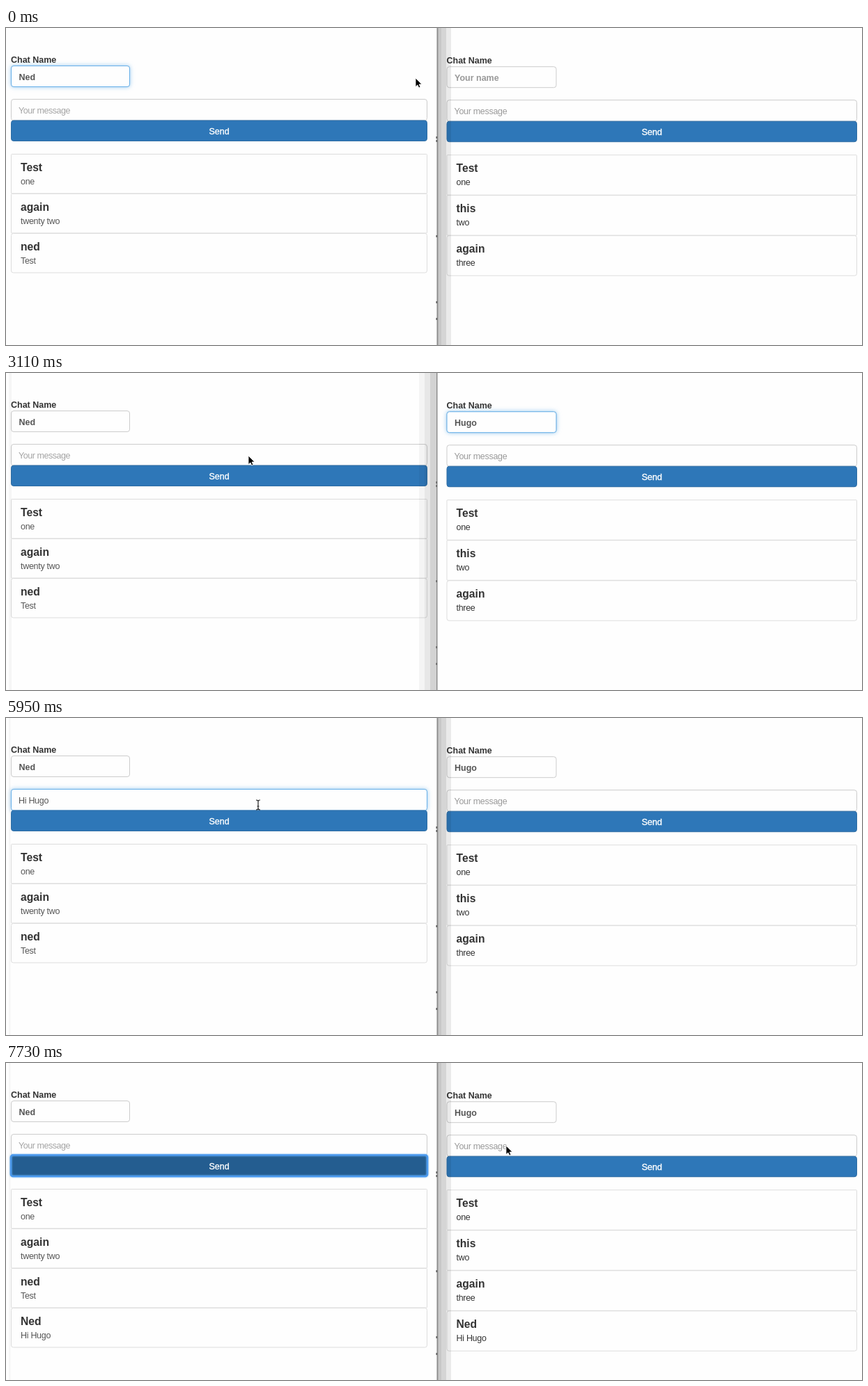
Recreate the animation shown at these times as an HTML page. Size 1229 px wide and 456 px high, loop 8 s.

```html
<!DOCTYPE html>
<html lang="en">
<head>
<meta charset="utf-8">
<title>Chat demo</title>
<style>
html, body { margin: 0; width: 100%; height: 100%; overflow: hidden; background: #fefefe; }
svg { display: block; width: 100%; height: 100%; }
text { font: 12.5px "Liberation Sans", Arial, sans-serif; fill: #333; white-space: pre; }
.label { font-weight: bold; }
.name { font-weight: bold; fill: #555; }
.head { font-weight: bold; font-size: 15.7px; }
.light { letter-spacing: -.3px; fill: #555; }
.right .light { fill: #333; }
.name.hint, .light.hint { fill: #999; }
.left .light.hint { letter-spacing: -.45px; fill: #a4a4a4; }
.send { fill: #fff; stroke: #fff; stroke-width: .35px; text-anchor: middle; }
.field { fill: #fefefe; stroke: #ccc; }
.item { fill: none; stroke: #ddd; }
.ring { fill: #fefefe; stroke: #66afe9; filter: drop-shadow(0 0 3px #66afe9aa); }
.halo { fill: none; stroke: #4a98ee; stroke-width: 2.5px; filter: drop-shadow(0 0 1px #66afe9); }
</style>
</head>
<body>
<svg id="stage" viewBox="0 0 1229 456"></svg>
<script>
const LOOP = 8000;
const stage = document.getElementById('stage');
const ME = 'Ned', FRIEND = 'Hugo', HELLO = 'Hi ' + FRIEND;

// time, shape, x, y
const moves = [
  [0, 'arrow', 588, 72], [140, 'arrow', 604, 73], [290, 'arrow', 682, 75],
  [440, 'arrow', 790, 77], [580, 'arrow', 834, 76], [730, 'arrow', 834, 75],
  [880, 'arrow', 796, 74], [1020, 'beam', 730, 73], [1170, 'beam', 710, 73],
  [2670, 'arrow', 660, 93], [2810, 'arrow', 520, 140], [2960, 'arrow', 390, 148],
  [3110, 'arrow', 348, 119], [3410, 'beam', 349, 122], [5950, 'beam', 362, 125],
  [6100, 'arrow', 401, 138], [6250, 'hand', 437, 154], [6390, 'hand', 445, 166],
  [7290, 'hand', 468, 165], [7440, 'hand', 560, 154], [7590, 'arrow', 668, 132],
  [7730, 'arrow', 718, 119]
];
// time, letters typed
const friendKeys = [[0, 0], [2070, 1], [2220, 2], [2370, 3], [2520, 4]];
const helloKeys = [[0, 0], [4760, 1], [4910, 2], [5060, 3], [5360, 4], [5510, 6], [5650, 7], [6690, 0]];

const shapes = {
  arrow: '<path d="M0 0V12.6L2.9 9.9 4.8 14 6.9 13 5.1 9H9Z" fill="#000" stroke="#fff" stroke-width=".8"/>',
  beam: '<path d="M-3-7Q0-7 0-5Q0-7 3-7M0-5V5M-3 7Q0 7 0 5Q0 7 3 7M-1.5 2H1.5" fill="none" stroke="#222" stroke-width="1.2"/>',
  hand: '<path d="M-3.6 1V-6Q-2.5-8.2-1.4-6V-2Q0-3.4 1-1.6Q2.4-2.6 3.3-1Q5.4-1.8 5.6 1V3Q5.6 5 4.2 7.5H-2.2Q-3-.0-5.8 1.6Q-6.4-.4-3.6 1Z" fill="#fff" stroke="#111"/><path d="M-.6 2V5M1.4 2V5M3.3 2V5" stroke="#111" stroke-width=".7"/>'
};

const latest = (list, t) => list.filter(k => k[0] <= t).pop();
const clamp = v => Math.max(0, Math.min(1, v));
const fade = (t, from, to) => clamp((t - from) / 150) * clamp(1 - (t - to) / 150);
const text = (x, y, cls, s) => `<text x="${x}" y="${y}" class="${cls}">${s}</text>`;
const rect = (x, y, w, h, attrs) => `<rect x="${x}" y="${y}" width="${w}" height="${h}" ${attrs}/>`;
const shade = (x, w, alpha) => rect(x, 0, w, 456, `opacity="${alpha}"`);

function field(x, y, w, h, glow) {
  return rect(x, y, w, h, 'rx="3.5" class="field"') +
    (glow ? rect(x, y, w, h, `rx="3.5" class="ring" opacity="${glow}"`) : '');
}

function pane(p) {
  const { x, y, w, pitch } = p, mid = x + w / 2;
  let out = text(x, y + 50, 'label', 'Chat Name') +
    field(x + .5, y + 54.5, p.nameW, 30, p.nameGlow) +
    text(x + 11.5, y + 75, p.name ? 'name' : 'name hint', p.name || 'Your name') +
    field(x + .5, y + 102.5, w - 1, 30.5, p.messageGlow) +
    text(x + 11, y + 123, p.message ? 'light' : 'light hint', p.message || 'Your message') +
    rect(x + .5, y + 133, w - 1, 29.5, p.dark
      ? 'rx="3.5" fill="#245d90" stroke="#204d74"'
      : 'rx="3.5" fill="#2e77b8" stroke="#2e6da4"') +
    (p.halo ? rect(x, y + 132.5, w, 30.5, 'rx="3" class="halo"') : '') +
    text(mid, y + 152.5, 'send', 'Send');
  p.items.forEach(([head, body], i) => {
    const top = y + 181.5 + i * pitch;
    out += rect(x + .5, top, w - 1, pitch - .5, `rx="${i == p.items.length - 1 ? 3 : 1}" class="item"`) +
      text(x + 14, top + 24, 'head', head) + text(x + 14, top + 43.5, 'light', body);
  });
  return `<g class="${p.side}">${out}</g>`;
}

const caret = (x, y) => rect(x, y, 1, 14, 'fill="#333"');

function draw(t) {
  const friend = FRIEND.slice(0, latest(friendKeys, t)[1]);
  const hello = HELLO.slice(0, latest(helloKeys, t)[1]);
  const rightActive = t >= 730 && t < 3260;
  const sent = t >= 6840 ? [[ME, HELLO]] : [];
  const [, shape, cx, cy] = latest(moves, t);

  let out = rect(0, 0, 1229, 456, 'fill="#fefefe"') +
    pane({
      side: 'left', x: 7, y: 0, w: 598, pitch: 57, nameW: 170, name: ME, message: hello,
      nameGlow: t < 2000 ? clamp(1 - (t - 730) / 150) : fade(t, 3260, 3860),
      messageGlow: fade(t, 3860, 6540), dark: t >= 6250, halo: t >= 6540,
      items: [['Test', 'one'], ['again', 'twenty two'], [ME.toLowerCase(), 'Test'], ...sent]
    }) +
    pane({
      side: 'right', x: 632.5, y: 1.2, w: 589.5, pitch: 58, nameW: 157, name: friend, message: '',
      nameGlow: fade(t, 1470, 3260), messageGlow: 0,
      items: [['Test', 'one'], ['this', 'two'], ['again', 'three'], ...sent]
    });

  // window shadows fall on the inactive side
  out += rightActive
    ? shade(4, 4, .03) + shade(593, 8, .04) + shade(601, 8, .09) + shade(609, 9, .17) + shade(618, 1.5, .45)
    : shade(618.5, 2, .45) + shade(620.5, 4.5, .21) + shade(625, 7, .16) + shade(632, 7, .08) +
      (t >= 3260 ? shade(4, 2.5, .03) : '');
  for (const y of [156, 161, 298, 393, 417]) out += rect(617.5, y, 1.5, 3, 'fill="#555"');

  out += `<g transform="translate(${cx} ${cy})">${shapes[shape]}</g>`;
  return { out, friend, hello, typingName: t >= 2070 && t < 2520, typingHello: t >= 4760 && t < 5650 };
}

// place the caret right after the typed text
function addCaret(selector, y) {
  const el = stage.querySelector(selector);
  const x = +el.getAttribute('x') + el.getComputedTextLength();
  stage.insertAdjacentHTML('beforeend', caret(x, y));
}

let shown = '';
function tick() {
  const s = draw(performance.now() % LOOP);
  const key = s.out + s.typingName + s.typingHello;
  if (key !== shown) {
    shown = key;
    stage.innerHTML = s.out;
    if (s.typingName) addCaret('.right .name', 64);
    if (s.typingHello) addCaret('.left .light', 111);
  }
  requestAnimationFrame(tick);
}
tick();
</script>
</body>
</html>
```
